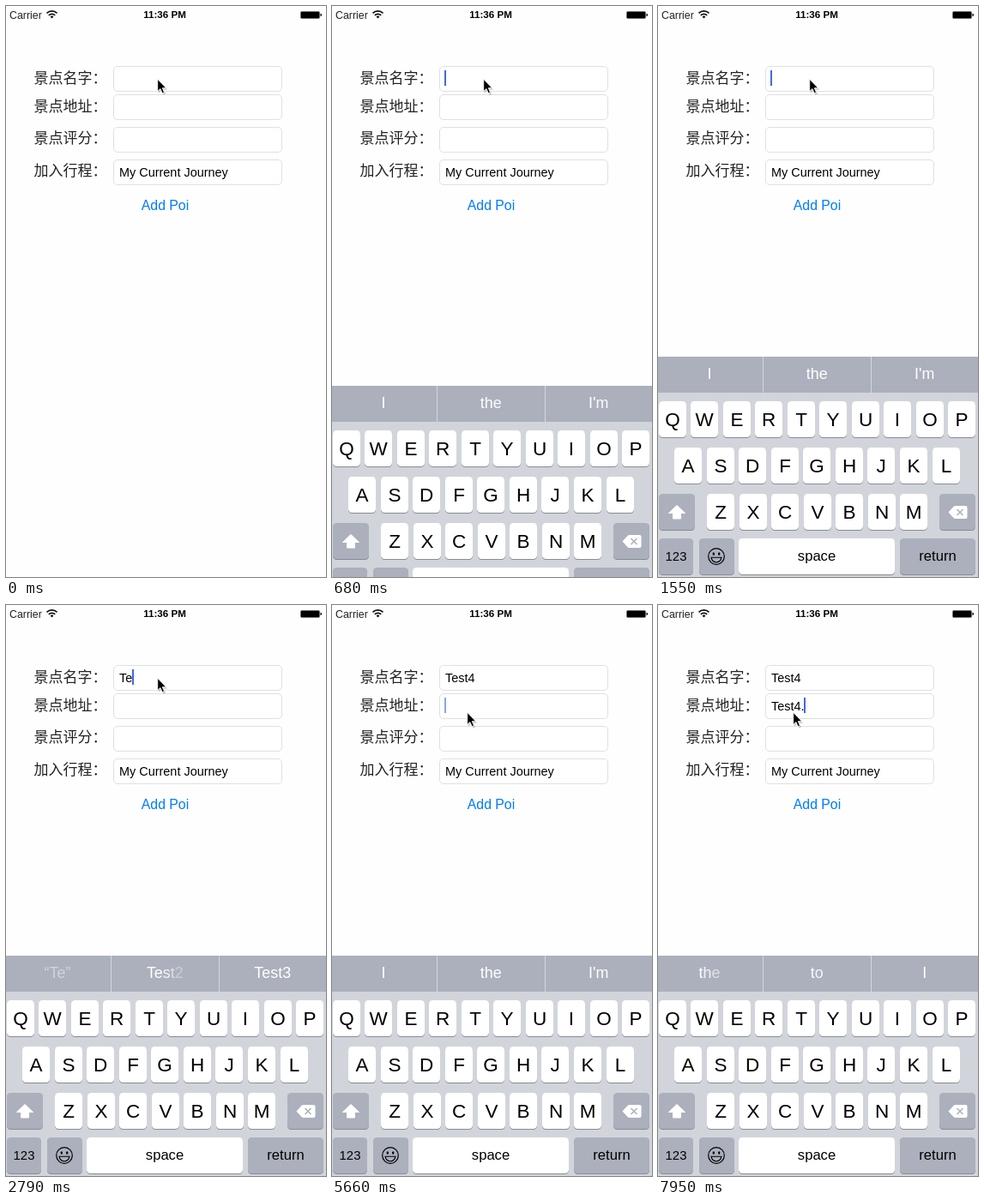
Write an HTML page that moves like this. It is 373 px wide and 666 px high and loops after 8 s.

```html
<!DOCTYPE html>
<html lang="zh-CN">
<head>
<meta charset="utf-8">
<title>Add Poi</title>
<style>
  html, body { margin: 0; width: 100%; height: 100%; overflow: hidden; background: #fefefe; }
  svg { display: block; font-family: "Liberation Sans", Arial, sans-serif; }
  .label { font: 300 17px "Noto Sans CJK SC", "Noto Sans CJK", sans-serif; fill: #222; }
  .box { fill: #fff; stroke: #e0e0e0; }
  .value { font-size: 14.45px; }
  .mid { text-anchor: middle; }
  .hint { font-size: 17.9px; fill: #fff; }
  .letter { font-size: 22.5px; }
  .word { font-size: 16.6px; }
  .digits { font-size: 14.9px; }
</style>
</head>
<body>
<svg id="stage" width="373" height="666" viewBox="0 0 373 666">
  <rect width="373" height="666" fill="#fefefe"/>

  <text x="4" y="14.6" font-size="12.4" fill="#222">Carrier</text>
  <g fill="none" stroke="#111" stroke-width="1.7">
    <path d="M47.5 8.3a8.6 8.6 0 0 1 12 0M49.8 10.8a5.3 5.3 0 0 1 7.4 0"/>
    <path d="M53.5 14.6l-1.9-2.1a2.8 2.8 0 0 1 3.8 0z" fill="#111" stroke="none"/>
  </g>
  <text class="mid" x="185" y="14.4" font-size="11.6" font-weight="700">11:36 PM</text>
  <rect x="343.5" y="6.5" width="22" height="8" rx="1" fill="none" stroke="#444" stroke-width=".8"/>
  <rect x="344" y="7" width="21" height="7"/>
  <path d="M366.5 8.8q1.6.3 1.6 1.7t-1.6 1.7z"/>

  <g id="form"></g>
  <text class="mid" x="185.5" y="237.6" font-size="15.8" fill="#007aff">Add Poi</text>
  <rect id="caret" width="2" height="18" fill="#4169e1"/>

  <g id="keyboard">
    <rect width="373" height="260" fill="#d1d5db"/>
    <rect width="373" height="42" fill="#abb0bc"/>
    <path d="M122.5 0v42M248.5 0v42" stroke="#d4d7dd"/>
    <g id="hints"></g>
    <g id="keys"></g>
    <path d="M22 173.5l9.5 9h-5v6.5h-9v-6.5h-5z" fill="#fff" stroke="#fff" stroke-linejoin="round"/>
    <path d="M338.5 181.5l6-6.5q1-1 2-1h12q2 0 2 2v11q0 2-2 2h-12q-1 0-2-1z" fill="#fff"/>
    <path d="M348.5 178l7 7m0-7l-7 7" stroke="#abb0bc" stroke-width="1.5"/>
    <g transform="translate(68 233)">
      <circle r="9.3" fill="none" stroke="#000" stroke-width="1.2"/>
      <ellipse cx="-3.2" cy="-3" rx="1.2" ry="1.8"/>
      <ellipse cx="3.2" cy="-3" rx="1.2" ry="1.8"/>
      <path d="M-6 1.2H6Q5 6.8 0 6.8T-6 1.2z" fill="none" stroke="#000" stroke-width="1.1"/>
    </g>
  </g>

  <g id="mouse">
    <path d="M1 1.5v15l3.4-3 2.4 5 2.6-1.1-2.3-5H11.5z" opacity=".2"/>
    <path d="M0 0v14.2l3.2-2.9 2.3 5.1 2.3-1-2.2-5h4.5z" stroke="#fff" stroke-width=".9"/>
  </g>
</svg>

<script>
const LOOP = 8000, START = 497, STEP = 87.5;
const $ = id => document.getElementById(id);
const clamp = v => Math.max(0, Math.min(1, v));

function add(parent, tag, attrs, text = "") {
  const node = document.createElementNS("http://www.w3.org/2000/svg", tag);
  for (const name in attrs) node.setAttribute(name, attrs[name]);
  node.textContent = text;
  return parent.appendChild(node);
}

// Form
const values = ["景点名字：", "景点地址：", "景点评分：", "加入行程："].map((label, i) => {
  const y = [70, 103, 141, 179][i];
  add($("form"), "text", { class: "label", x: 32.5, y: [90, 122.5, 160, 197.5][i] }, label);
  add($("form"), "rect", { class: "box", x: 125.5, y: y + .5, width: 196, height: 29, rx: 4.5 });
  return add($("form"), "text", { class: "value", x: 132, y: y + 20 });
});
values[3].textContent = "My Current Journey";

// Keys, relative to the top of the keyboard
function key(x, y, w, text, cls, fill = "#fff") {
  add($("keys"), "rect", { x, y: y + 1, width: w, height: 42, rx: 4.5, fill: "#888b92" });
  add($("keys"), "rect", { x, y, width: w, height: 42, rx: 4.5, fill });
  add($("keys"), "text", { class: "mid " + cls, x: x + w / 2, y: y + (cls == "letter" ? 29 : 26) }, text);
}
["QWERTYUIOP", "ASDFGHJKL", "ZXCVBNM"].forEach((row, r) =>
  [...row].forEach((c, i) =>
    key(Math.round([.7, 19.3, 57][r] + i * 37.53), 52 + r * 54, 32, c, "letter")));
const GREY = "#abb0bc";
key(1, 160, 42, "", "word", GREY);
key(328, 160, 42, "", "word", GREY);
key(1, 212, 40, "123", "digits", GREY);
key(48, 212, 41, "", "word", GREY);
key(94, 212, 182, "space", "word");
key(282, 212, 88, "return", "word", GREY);

const typed = [
  { text: "Test4", at: [22, 24, 27, 32, 38] },
  { text: "Test4.", at: [63, 64, 66, 69, 71, 83] }
];
const blink = [0, 6, 11, 17, 22, 47.5, 53, 59, 62, 79, 83];   // in, out, in, ...
const suggestions = [
  [-.45, "I", "the", "I'm"],
  [22.3, "“T”", "To", "Test3"],
  [23.7, "“Te”", "Test2", "Test3"],
  [28, "“Tes”", "Test2", "Test3"],
  [34, "“Test”", "Test2", "Test3"],
  [39.5, "“Test4”", "", ""],
  [53.3, "I", "the", "I'm"],
  [63.5, "“T”", "To", "Test3"],
  [65, "“Te”", "Test2", "Test3"],
  [67, "“Tes”", "Test2", "Test3"],
  [71, "“Test4”", "", ""],
  [83.1, "the", "to", "I"]
];

// One entry per suggestion, living until its slot changes
const hints = [];
[60, 185.3, 310.7].forEach((x, slot) => {
  let last;
  for (const set of suggestions) {
    const text = set[slot + 1];
    if (last && last.text == text) continue;
    if (last) last.to = set[0];
    const node = add($("hints"), "text", { class: "mid hint", x, y: 25.7 });
    const letters = [...text].map(c => add(node, "tspan", {}, c));
    hints.push(last = { text, node, letters, from: set[0], to: Infinity });
  }
});

function drawHint(h, n) {
  const out = 1 - clamp((n - h.to) / 1.7);
  const on = n >= h.from && out > 0;
  h.node.style.display = on ? "" : "none";
  if (!on) return;
  const quoted = h.text[0] == "“";
  h.letters.forEach((letter, i) => {
    const fade = quoted ? (n - h.from) / 5 : (n - h.from - i * .42) / 1.7;
    letter.setAttribute("fill-opacity", clamp(fade) * out);
  });
}

function caretAlpha(n) {
  const i = blink.filter(s => s <= n).length - 1;
  if (i < 0) return 0;
  const age = n - blink[i] + 1;
  return i % 2 ? clamp(1 - age / 2.5) : clamp(age / 2);
}

function draw(ms) {
  const n = Math.floor((ms - START) / STEP);

  typed.forEach(({ text, at }, i) => {
    values[i].textContent = text.slice(0, at.filter(s => s <= n).length);
  });

  const field = n < 53 ? 0 : 1;
  const caret = $("caret");
  caret.setAttribute("x", Math.round(132 + values[field].getComputedTextLength() - .7));
  caret.setAttribute("y", field ? 108 : 75);
  caret.setAttribute("opacity", caretAlpha(n));

  // Critically damped slide
  const k = Math.max(0, .0191 * (n * STEP + 11));
  const top = n < 0 ? 666 : Math.round(409 + 257 * (1 + k) * Math.exp(-k));
  $("keyboard").setAttribute("transform", `translate(0 ${top})`);
  hints.forEach(h => drawHint(h, n));

  const p = clamp((n - 43) / 3), e = p * p * (3 - 2 * p);
  $("mouse").setAttribute("transform", `translate(${176.7 - 19 * e} ${85.3 + 40 * e})`);
}

function tick() {
  draw(performance.now() % LOOP);
  requestAnimationFrame(tick);
}
tick();
</script>
</body>
</html>
```
